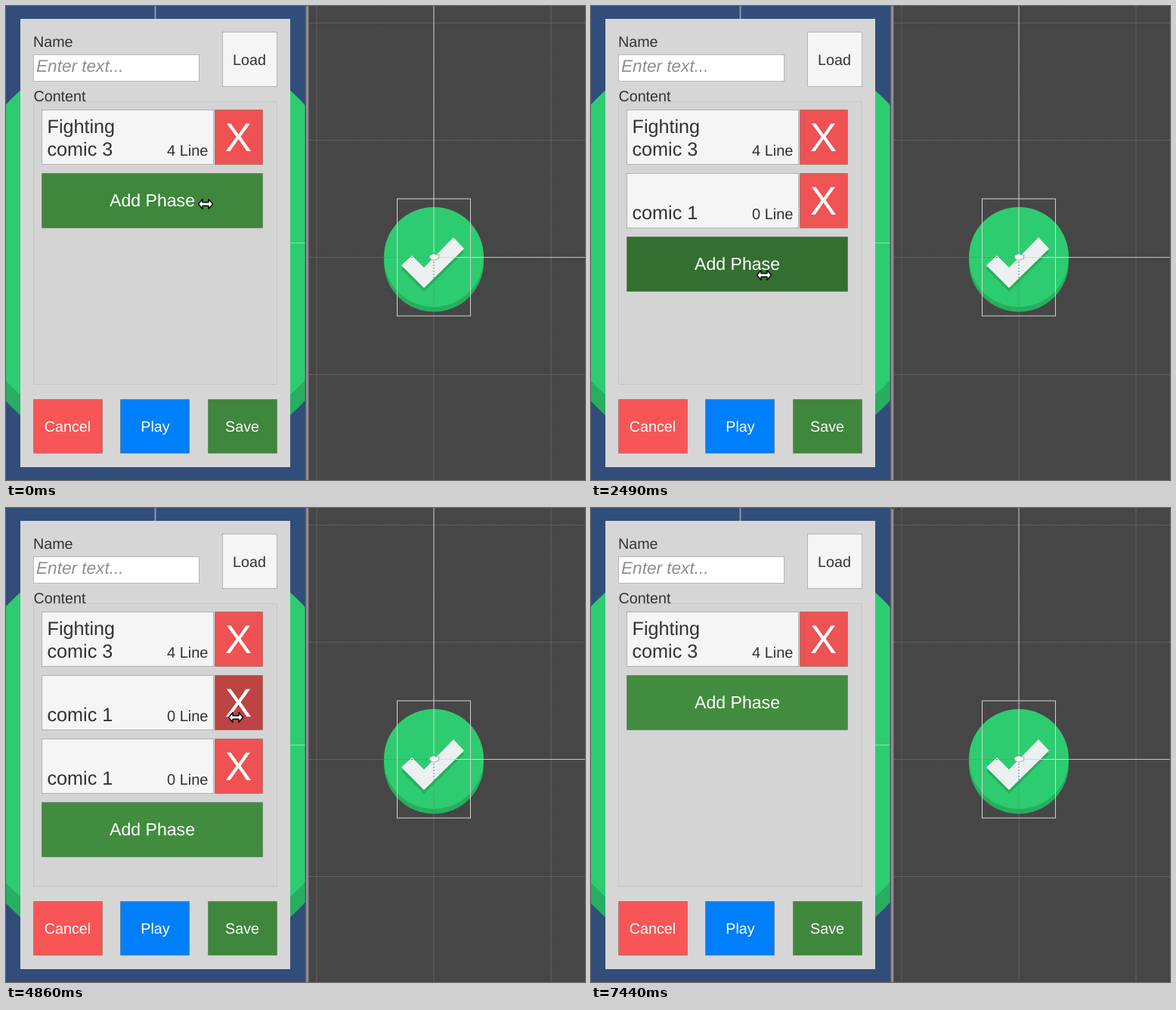
Animation of 766 by 627 pixels, one loop 7860 ms. Source, as an HTML page:

```html
<!DOCTYPE html>
<html lang="en">
<head>
<meta charset="utf-8">
<title>Phase editor</title>
<style>
  html, body { margin: 0; width: 100%; height: 100%; overflow: hidden; background: #464646; }
  svg { display: block; width: 766px; height: 627px; font-family: "Liberation Sans", Arial, sans-serif; text-rendering: geometricPrecision; }
</style>
</head>
<body>
<svg id="stage" viewBox="0 0 766 627" xmlns="http://www.w3.org/2000/svg"></svg>
<script>
const LOOP = 7860, STEP = 30, FADE = 100;
const INK = '#323232', WHITE = '#fff', ROW_PITCH = 84;
const stage = document.getElementById('stage');

// ---- markup helpers ----
const rect = (x, y, w, h, fill, extra = '') =>
  `<rect x="${x}" y="${y}" width="${w}" height="${h}" fill="${fill}" ${extra}/>`;
const line = (x1, y1, x2, y2, color, extra = '') =>
  `<line x1="${x1}" y1="${y1}" x2="${x2}" y2="${y2}" stroke="${color}" ${extra}/>`;
const text = (str, x, y, size, fill = INK, anchor = 'start', extra = '') =>
  `<text x="${x}" y="${y}" font-size="${size}" fill="${fill}" text-anchor="${anchor}" ${extra}>${str}</text>`;
const edge = 'stroke="#000" stroke-opacity=".22"';
const box = (id, x, y, w, h, fill) => rect(x + .5, y + .5, w - 1, h - 1, fill, `id="${id}" ${edge}`);

function gameView() {
  return rect(0, 0, 396, 627, '#314d79') +
    '<svg width="396" height="627">' +
    '<circle cx="197.5" cy="340" r="269" fill="#27ae60"/>' +
    '<circle cx="197.5" cy="313" r="269" fill="#2ecc71"/></svg>' +
    line(197.5, 0, 197.5, 17, '#8b98b0', 'stroke-width="2"') +
    line(376, 313.5, 396, 313.5, '#86e3ac') +
    rect(395.5, 0, 1.5, 627, '#56566a') + rect(397, 0, 3, 627, '#938c93') + rect(400, 0, 1, 627, '#5b5b5b');
}

function sceneView() {
  let grid = '';
  for (let i = -10; i <= 12; i++)
    grid += line(566 + i * 15.5, 0, 566 + i * 15.5, 627, '#4b4b4b', 'stroke-dasharray="1 2"');
  for (let i = -21; i <= 19; i++)
    grid += line(401, 332.5 + i * 15.5, 766, 332.5 + i * 15.5, '#4b4b4b', 'stroke-dasharray="1 2"');
  for (const x of [411, 566, 721]) grid += line(x, 0, x, 627, '#606060');
  for (const y of [22.5, 177.5, 332.5, 487.5]) grid += line(401, y, 766, y, '#606060');
  const check = 'M523 343L537 330L553 346L592 306L606 321L553 373Z';
  return rect(401, 0, 365, 627, '#464646') + grid +
    line(566, 0, 566, 266, '#c4c4c4') + line(632, 332.5, 766, 332.5, '#c4c4c4') +
    '<circle cx="566" cy="338.5" r="66" fill="#27ae60"/><circle cx="566" cy="332" r="66" fill="#2ecc71"/>' +
    `<path d="${check}" fill="#27ae60" transform="translate(0 5)"/><path d="${check}" fill="#ecf0f1"/>` +
    line(566, 266, 566, 326, '#b9e9cd') + line(572, 332.5, 632, 332.5, '#b9e9cd') +
    line(566, 338, 566, 398, '#4f9670', 'stroke-dasharray="2 2"') +
    line(500, 332.5, 560, 332.5, '#4f9670', 'stroke-dasharray="2 2"') +
    rect(517.5, 255, 97, 155, 'none', 'stroke="#cfd4d0"') +
    '<path d="M560 332Q560 329 563 329Q566 326 569 329L573 329L572 335L569 335Q566 338 562 335Z" fill="#f4f4f4" stroke="#999" stroke-width=".8"/>';
}

function phaseRow(index, title, subtitle, count) {
  const y = 137 + index * ROW_PITCH;
  return `<g id="row${index}">` + rect(47.5, y + .5, 227, 72, '#f5f5f5', edge) +
    box('remove' + index, 276, y, 64, 73, '#ee5253') +
    text(title, 54.5, y + 31, 25.2) + text(subtitle, 54.5, y + 61, 25.2) +
    text(count, 267.5, y + 61, 20, INK, 'end') +
    text('X', 307.5, y + 55, 53, WHITE, 'middle') + '</g>';
}

function dropdown(y) {
  return rect(157, y, 183, 35.5, '#f5f5f5', 'rx="1"') + text('comic 1', 160, y + 26, 20.3) +
    `<path d="M314 ${y + 14}L322 ${y + 22}L330 ${y + 14}" fill="none" stroke="${INK}" stroke-width="2.6"/>`;
}

function dialog() {
  return '<g id="dialog">' + rect(37, 131, 321, 365, '#387736', 'rx="1"') +
    text('New Phase', 197.5, 175.5, 21.2, WHITE, 'middle', 'font-weight="700"') +
    rect(304, 150, 36, 35.5, '#f5f5f5', 'rx="1"') + text('X', 322, 175.5, 22.7, INK, 'middle') +
    text('Name', 146, 226.5, 18.2, WHITE, 'end') + rect(157, 205, 183, 35.5, WHITE, 'rx="1"') +
    text('Enter text...', 160.5, 231, 27.6, '#989898', 'start', 'font-style="italic"') +
    text('Bundle', 146, 281, 18.2, WHITE, 'end') + dropdown(259) +
    text('Background', 138, 327, 14.2, WHITE, 'end', 'font-weight="700"') +
    text('/ Comic', 146, 343, 14.2, WHITE, 'end', 'font-weight="700"') + dropdown(314) +
    rect(55, 369, 285, 108, '#f5f5f5', 'id="create" rx="1"') +
    text('New Phase', 197.5, 440, 47.2, INK, 'middle') + '</g>';
}

function panel() {
  return rect(19, 17, 357, 593, '#d6d6d6') +
    text('Name', 36, 53.5, 19.7) + box('input', 36, 64, 220, 36, WHITE) +
    text('Enter text...', 40, 87, 22.6, '#8f8f8f', 'start', 'id="hint" font-style="italic"') +
    box('load', 286, 34, 73, 73, '#f5f5f5') + text('Load', 322, 78, 19.7, INK, 'middle') +
    rect(36.5, 126.5, 322, 374, '#d4d4d4', 'stroke="#c5c5c5"') + text('Content', 36.5, 126, 19.7) +
    phaseRow(0, 'Fighting', 'comic 3', '4 Line') + phaseRow(1, '', 'comic 1', '0 Line') +
    phaseRow(2, '', 'comic 1', '0 Line') +
    '<g id="add">' + box('addBox', 47, 137, 293, 73, '#408a3d') +
    text('Add Phase', 193.5, 181, 23.1, WHITE, 'middle') + '</g>' +
    box('cancel', 36, 520, 92, 72, '#f85656') + text('Cancel', 81.5, 563, 19.7, WHITE, 'middle') +
    box('play', 151, 520, 92, 72, '#007ffa') + text('Play', 197.5, 563, 19.7, WHITE, 'middle') +
    box('save', 267, 520, 92, 72, '#3f873c') + text('Save', 312.5, 563, 19.7, WHITE, 'middle') +
    dialog();
}

const cursor = '<path id="cursor" d="M-9.5 0L-4 -6.5V-2.2H4V-6.5L9.5 0L4 6.5V2.2H-4V6.5Z" ' +
  'fill="#fff" stroke="#000" stroke-width="1.4" stroke-linejoin="round"/>';
stage.innerHTML = gameView() + sceneView() + panel() + cursor;
const el = {};
stage.querySelectorAll('[id]').forEach(node => { el[node.id] = node; });

// ---- timeline ----
const cursorPath = [
  [0, 264, 262], [120, 253, 266], [810, 253, 266], [960, 252, 300], [1110, 246, 372], [1260, 242, 414],
  [1890, 242, 414], [2070, 237, 386], [2220, 231, 363], [2370, 229, 356], [2760, 229, 356], [2940, 235, 381],
  [3420, 235, 380], [3480, 235, 378], [3630, 248, 352], [3810, 270, 312], [3960, 284, 286], [4110, 289, 279],
  [4440, 289, 279], [4590, 304, 277], [6450, 304, 277], [6480, 304, 273], [6600, 321, 208],
  [6750, 351, 85], [6840, 362, 10], [6870, 363, -14], [7260, 403, -14], [7320, 403, -6.5], [7440, 403, -6]
];
const dialogSpans = [[480, 1590], [2520, 3180]];

const ADD = { normal: '#428c3f', hover: '#3f873c', pressed: '#336c30' };
const REMOVE = { normal: '#f05353', hover: '#e75050', pressed: '#b94141' };
const CREATE = { normal: '#f5f5f5', hover: '#ececec', pressed: '#c6c6c6' };
const addStates = [[-200, 'hover'], [1590, 'normal'], [2070, 'hover'], [2430, 'pressed'], [3180, 'hover'],
  [3480, 'hover'], [3510, 'normal'], [5820, 'hover'], [6570, 'normal']];
const removeStates = [[-200, 'normal'], [3930, 'hover'], [4800, 'pressed'], [4890, 'hover'], [5730, 'pressed']];
const createStates = [[-200, 'normal'], [1110, 'hover'], [1500, 'pressed'], [1590, 'normal'],
  [2850, 'hover'], [3090, 'pressed'], [3180, 'normal']];

const enabledColors = { cancel: '#f85656', play: '#007ffa', save: '#3f873c', load: '#f5f5f5', input: '#ffffff', hint: '#8f8f8f' };
const disabledColors = { cancel: '#ca8a88', play: '#6b9bcd', save: '#82a081', load: '#c8c8c8', input: '#c9c9c9', hint: '#7b7b7b' };

const channels = hex => [1, 3, 5].map(i => parseInt(hex.slice(i, i + 2), 16));
function mix(from, to, k) {
  const a = channels(from), b = channels(to);
  return `rgb(${a.map((v, i) => Math.round(v + (b[i] - v) * k))})`;
}
const fadeAmount = elapsed => Math.max(0, Math.min(1, (elapsed + STEP) / FADE));

function stateColor(states, colors, t) {
  let i = states.length - 1;
  while (i > 0 && states[i][0] > t) i--;
  const previous = states[Math.max(0, i - 1)][1];
  return mix(colors[previous], colors[states[i][1]], fadeAmount(t - states[i][0]));
}

function cursorAt(t) {
  const last = cursorPath[cursorPath.length - 1];
  const i = cursorPath.findIndex(p => p[0] > t);
  if (i < 0) return [last[1], last[2]];
  const [t0, x0, y0] = cursorPath[i - 1], [t1, x1, y1] = cursorPath[i];
  const k = (t - t0) / (t1 - t0);
  return [x0 + (x1 - x0) * k, y0 + (y1 - y0) * k];
}

function disabledAmount(t) {
  for (const [open, close] of dialogSpans) {
    if (t >= open && t < close) return fadeAmount(t - open);
    if (t >= close && t < close + FADE) return 1 - fadeAmount(t - close);
  }
  return 0;
}

const show = (node, visible) => node.setAttribute('display', visible ? 'inline' : 'none');

function render(time) {
  const t = Math.floor((time % LOOP) / STEP) * STEP;
  const rows = 1 + (t >= 1590) + (t >= 3180) - (t >= 4890) - (t >= 5820);
  show(el.row1, rows > 1);
  show(el.row2, rows > 2);
  show(el.dialog, dialogSpans.some(([open, close]) => t >= open && t < close));
  el.add.setAttribute('transform', `translate(0 ${rows * ROW_PITCH})`);

  el.addBox.setAttribute('fill', stateColor(addStates, ADD, t));
  el.remove1.setAttribute('fill', stateColor(removeStates, REMOVE, t));
  el.create.setAttribute('fill', stateColor(createStates, CREATE, t));
  const dim = disabledAmount(t);
  for (const id in enabledColors)
    el[id].setAttribute('fill', mix(enabledColors[id], disabledColors[id], dim));

  el.cursor.setAttribute('transform', `translate(${cursorAt(t)})`);
}

const start = performance.now();
function tick() {
  render(performance.now() - start);
  requestAnimationFrame(tick);
}
tick();
</script>
</body>
</html>
```
